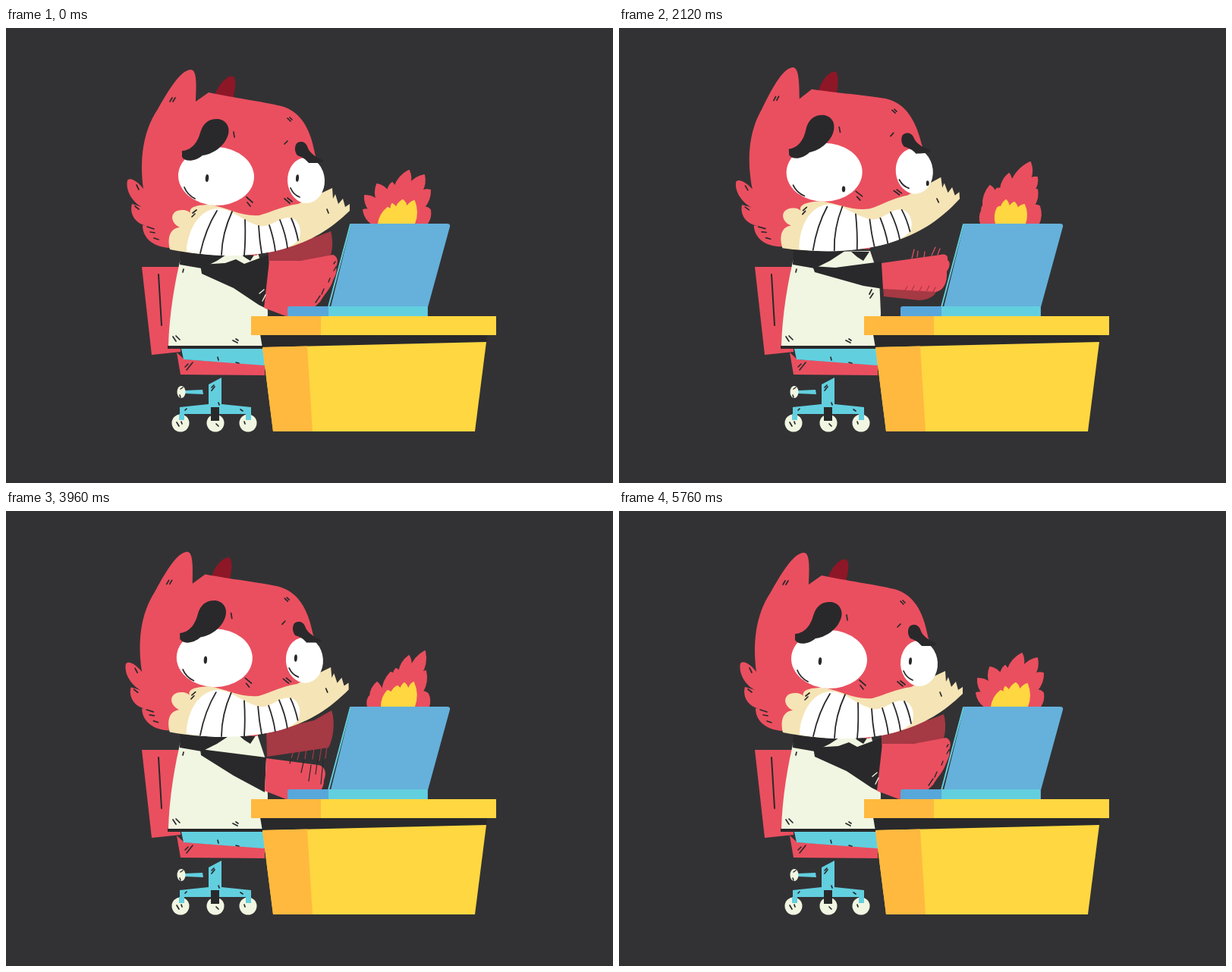
Recreate the animation shown at these times as an HTML page with a canvas. Size 800x600 px, loop 5.8 s.

```html
<!DOCTYPE html>
<html lang="en">
<head>
<meta charset="utf-8">
<title>Desk on fire</title>
<style>
html, body { margin: 0; width: 100%; height: 100%; overflow: hidden; background: #323234; }
canvas { display: block; }
</style>
</head>
<body>
<canvas id="stage" width="800" height="600"></canvas>
<script>
const ctx = document.getElementById('stage').getContext('2d');
const LOOP = 5800, STEP = 40, BOB = 480;
const BG = '#323234', INK = '#29292b', RED = '#ea4f5f', SHADE = '#a53944', CREAM = '#f5e4b5',
  CLOTH = '#f0f6e1', CYAN = '#62cfdf', BLUE = '#65b1db', GOLD = '#ffd741', AMBER = '#ffb93f';

function fill(d, color) {
  ctx.fillStyle = color;
  ctx.fill(new Path2D(d));
}
function line(d, width = 2, color = INK) {
  ctx.strokeStyle = color;
  ctx.lineWidth = width;
  ctx.stroke(new Path2D(d));
}
function oval(x, y, rx, ry, color, turn = 0) {
  ctx.fillStyle = color;
  ctx.beginPath();
  ctx.ellipse(x, y, rx, ry, turn, 0, Math.PI * 2);
  ctx.fill();
}
const clamp = v => Math.max(0, Math.min(1, v));
const ease = v => (1 - Math.cos(Math.PI * clamp(v))) / 2;
const mix = (a, b, k) => a + (b - a) * k;

// Head lift: quick rise, short rest, softer fall
function lift(t) {
  const p = t % BOB;
  return p < 240 ? ease((p - 60) / 150) : 1 - ease((p - 270) / 210);
}

// Flame outlines: valley, tip, valley, ... from left to right
const flames = [
  { at: 0,
    outer: [482,258, 471,240, 479,240, 473,221, 489,227, 489,206, 503,215, 509,204, 512,210, 531,188, 532,206, 551,194, 548,215, 559,214, 551,236, 559,240, 555,258],
    inner: [491,258, 503,237, 508,241, 509,232, 514,238, 523,227, 528,237, 538,228, 538,258] },
  { at: 120,
    outer: [477,258, 478,246, 480,244, 489,226, 496,240, 507,213, 511,215, 514,208, 518,212, 531,191, 533,208, 552,185, 547,215, 553,211, 549,238, 556,241, 557,258],
    inner: [495,258, 503,237, 508,240, 516,231, 520,236, 525,227, 530,237, 537,226, 538,258] },
  { at: 200,
    outer: [477,258, 478,241, 480,234, 489,208, 496,217, 498,212, 503,212, 514,192, 517,204, 542,177, 542,199, 551,197, 547,214, 551,213, 547,234, 554,235, 553,258],
    inner: [497,258, 499,237, 504,236, 510,227, 514,238, 521,230, 525,239, 534,233, 535,258] },
  { at: 360,
    outer: [480,258, 479,237, 480,231, 486,215, 492,219, 496,213, 498,213, 505,199, 511,206, 535,183, 537,211, 549,213, 545,232, 556,233, 551,244, 561,249, 562,258],
    inner: [500,258, 505,241, 509,242, 513,232, 516,241, 522,234, 526,244, 534,235, 536,258] }
];

function tongue(a, b, k, color) {
  const pt = i => [mix(a[2 * i], b[2 * i], k), mix(a[2 * i + 1], b[2 * i + 1], k)];
  let [x, y] = pt(0);
  ctx.beginPath();
  ctx.moveTo(x, y);
  for (let i = 1; i < a.length / 2; i++) {
    const [nx, ny] = pt(i), dx = nx - x, dy = ny - y;
    ctx.quadraticCurveTo(x + dx / 2 + dy * 0.2, y + dy / 2 - dx * 0.2, nx, ny);
    [x, y] = [nx, ny];
  }
  ctx.closePath();
  ctx.fillStyle = ctx.strokeStyle = color;
  ctx.lineWidth = 2;
  ctx.fill();
  ctx.stroke();
}

function drawFlame(t) {
  const p = t % BOB;
  let i = flames.length - 1;
  while (flames[i].at > p) i--;
  const a = flames[i], b = flames[(i + 1) % flames.length];
  const k = (p - a.at) / ((b.at || BOB) - a.at);
  tongue(a.outer, b.outer, k, RED);
  tongue(a.inner, b.inner, k, GOLD);
}

function drawChair() {
  fill('M179 315H228L230 427L192 431Z', RED);
  line('M201 325L205 392');
  fill('M225 428L235 437L341 444V458L230 457Z', RED);
  fill('M231 423H341V445L234 437Z', CYAN);
  line('M236 447L240 443M238 451L246 441M279 434L280 438M303 441L307 442', 1.6);
  fill('M267 470L284 461V496L323 500V517H317V509H235V517H229V500L267 496Z', CYAN);
  for (const x of [230, 276, 319]) oval(x, 521, 11.5, 11.5, CLOTH);
  fill('M228 509H235V517H228ZM316 509H323V517H316Z', CYAN);
  fill('M270 500H281V518H270Z', INK);
  line('M225 520L228 525M231 519L232 522M277 522L280 525M314 519L315 522M271 474L274 471M271 478L275 473M280 494L281 497M236 504L238 502M309 503L312 505', 1.7);
  fill('M236 478L259 477L260 483L236 482Z', CYAN);
  oval(231, 480, 5.5, 8, CLOTH);
  line('M230 476L233 474M229 484L230 487', 1.5);
}

function drawBody() {
  fill('M232 296C222 335 215 380 214 419H343L345 376L343 330L331 294Z', CLOTH);
  fill('M230 290H304L278 307L258 317L229 312Z', INK);
  fill('M306 295H330L322 307L314 302Z', INK);
  fill('M213 419H342V423H213Z', INK);
  line('M234 318L233 322M220 407L224 413M224 406L229 411M333 345L330 351M335 350L331 356M299 412L305 415M303 410L306 412', 1.7);
}

function poseLow() {
  fill('M343 291L406 276L429 263C434 276 432 300 425 312L344 324Z', SHADE);
  fill('M256 314L343 325L341 371L300 349L257 322Z', INK);
  fill('M343 326L412 335C421 337 423 346 419 355C419 367 413 370 405 380H369L341 369Z', RED);
  line('M379 316L376 326M388 313L384 328M397 306L394 327M407 305L404 327M417 303L413 329M424 303L421 326', 1.2, SHADE);
  line('M376 326L374 333M393 327L389 345M402 335L399 356M411 325L408 347M418 329L415 360', 1.2, INK);
}

function poseHigh() {
  fill('M348 342L419 346C416 354 407 359 395 359L349 354Z', SHADE);
  fill('M255 314L285 316L346 308L348 344L322 340L258 322Z', INK);
  fill('M346 310L424 299C432 297 434 302 433 306C438 309 435 317 432 321C433 335 428 346 418 348L348 344Z', RED);
  line('M386 304L389 292M393 302L394 294M402 302L403 295M412 300L417 289M420 299L423 291', 1.2, RED);
  line('M373 352L380 341M382 354L389 340M391 356L399 341M401 355L409 340M411 353L417 342', 1.2, SHADE);
}

function poseSweep() {
  fill('M345 290L410 275L428 268C432 282 430 300 425 305L346 309Z', SHADE);
  fill('M256 312L289 310L303 305L314 311L346 299L345 371L333 365L300 343L258 324Z', INK);
  fill('M347 307L388 307L431 299C439 302 437 311 435 315C437 322 433 328 431 333C427 345 420 350 414 361L398 376L369 380L340 369Z', RED);
  line('M408 362L414 353M416 351L419 344M425 335L427 330M432 320L435 315M432 311L434 308', 1.4);
  line('M334 350L340 345M338 360L342 352', 1.4, CLOTH);
}

const poses = [poseSweep, poseHigh, poseSweep, poseLow];

function drawPupils(t) {
  if (t >= 5080 && t < 5240) {
    fill('M285 195L317 194L316 200L285 202Z', INK);
    fill('M396 192L416 192V198L397 199Z', INK);
    return;
  }
  const down = t < 2000 ? ease((t - 600) / 120) : 1 - ease((t - 2520) / 120);
  oval(mix(265, 301, down), mix(198, 219, down), 2.2, mix(5, 4, down), INK, 0.08);
  oval(mix(384, 412, down), mix(198, 218, down), 2, mix(4.8, 3.5, down), INK, 0.08);
}

function drawHead(t) {
  ctx.save();
  ctx.translate(187, 300);
  ctx.rotate(-0.06 * lift(t));
  ctx.translate(-187, -300);

  fill('M275 90C279 74 293 61 300 64C304 70 302 82 299 93Z', '#8d1727');
  fill('M181 212C176 174 180 137 200 107C212 86 229 56 243 55C252 54 251 76 250 97L267 85C300 92 338 97 363 103C388 110 401 132 407 165L418 205L398 242L330 300L216 290C194 289 180 277 180 260L188 261C172 260 162 246 166 232L179 236C167 230 157 214 160 201C164 196 174 203 181 212Z', RED);

  // Muzzle and grin
  fill('M216 292C212 275 217 264 229 263C215 256 216 240 232 240C238 240 241 242 243 244C240 235 255 233 270 233C292 237 310 249 334 247C352 242 364 235 385 232L430 211L431 225L434 219L438 232L444 225L447 236L453 232V241C427 266 402 281 367 291C323 303 265 302 216 292Z', CREAM);
  fill('M238 295C238 278 247 246 272 239C294 233 310 255 335 261C350 264 363 246 378 251C388 256 390 270 386 279C379 287 369 291 351 295C314 302 276 302 238 295Z', '#fff');
  line('M278 241Q263 265 256 297M298 242Q285 270 284 299M315 253Q316 278 314 300M333 261Q334 280 337 297M347 260Q353 278 355 294M361 253Q369 273 371 290M376 251Q382 264 385 280', 1.8);

  oval(277, 195.5, 50, 38.5, '#fff', 0.04);
  oval(395.5, 201, 24.5, 30, '#fff', -0.05);
  line('M235 210Q239 220 249 225M375 211Q379 220 387 223', 1.8);
  drawPupils(t);

  fill('M232 162C246 161 253 149 256 138C260 124 269 119 280 120C292 122 296 133 292 143C287 157 271 167 259 168C251 175 237 178 232 170Z', INK);
  fill('M382 154C384 149 394 148 397 156C400 166 410 171 419 175C417 179 405 178 399 178C393 171 389 170 384 168C381 164 380 159 382 154Z', INK);

  line('M216 97L219 92M220 97L223 92M300 137L301 144M371 119L375 123M374 118L377 121M367 153L371 149M317 223L325 230M318 230L322 235M367 225L374 231M371 224L377 229M172 207L175 213M170 235L175 239M186 262L195 265M190 269L196 270M195 277L201 279M246 244L251 240M245 249L249 245M423 239L425 244', 1.7);
  ctx.restore();
}

function drawDesk() {
  fill('M455 258H581Q586 258 585 262L556 368V380H425Z', BLUE);
  line('M454 259L425 368', 2, CYAN);
  fill('M425 367H555V380H425Z', CYAN);
  fill('M374 367H425V380H371V370Q371 367 374 367Z', '#58a7da');
  fill('M335 404H634L633 415L338 422Z', INK);
  fill('M323 380H646V405H323Z', GOLD);
  fill('M323 380H415V405H323Z', AMBER);
  fill('M338 421L633 414L618 532H352Z', GOLD);
  fill('M338 421L397 419.6L404 532H352Z', AMBER);
}

function draw(now) {
  const t = Math.floor((now % LOOP) / STEP) * STEP;
  ctx.fillStyle = BG;
  ctx.fillRect(0, 0, 800, 600);
  ctx.lineCap = ctx.lineJoin = 'round';
  drawChair();
  drawBody();
  poses[(t / STEP) % poses.length]();
  drawHead(t);
  drawFlame(t);
  drawDesk();
}

let start;
function tick(now) {
  if (start === undefined) start = now;
  draw(now - start);
  requestAnimationFrame(tick);
}
draw(0);
requestAnimationFrame(tick);
</script>
</body>
</html>
```
